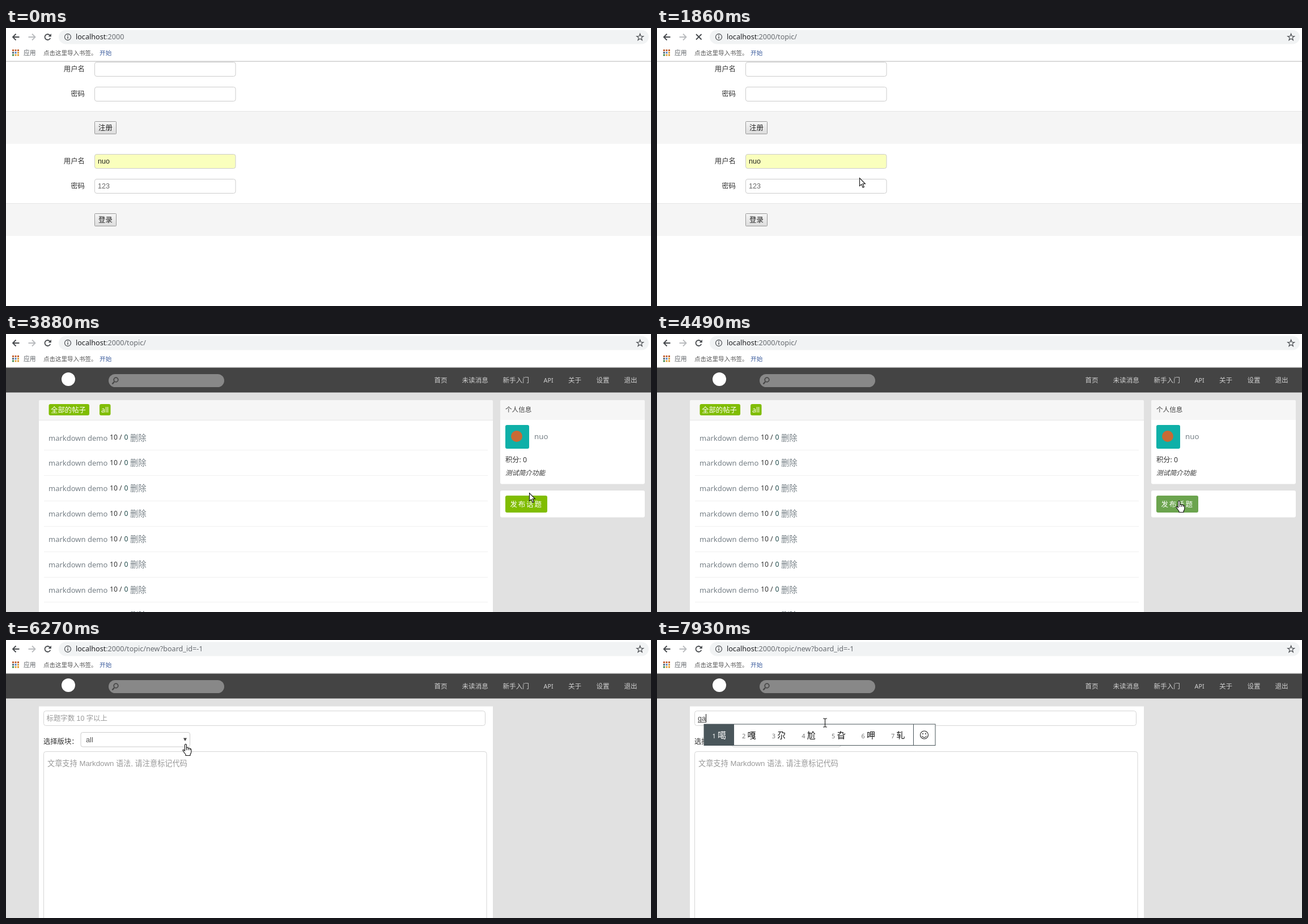
Write an HTML page with a canvas that moves like this. It is 1138 px wide and 492 px high and loops after 8000 ms.

```html
<!DOCTYPE html>
<html lang="zh-CN">
<head>
<meta charset="utf-8">
<title>localhost:2000</title>
<style>
html, body { margin: 0; width: 100%; height: 100%; overflow: hidden; background: #fff; }
canvas { display: block; width: 1138px; height: 492px; }
</style>
</head>
<body>
<canvas id="stage" width="1138" height="492"></canvas>
<script>
const ctx = document.getElementById('stage').getContext('2d');
const LOOP = 8000, TICK = 77.5;
const CJK = '"Noto Sans CJK SC", "Noto Sans CJK", sans-serif';
const UI = '"Noto Sans", ' + CJK;
const ARIAL = '"Liberation Sans", ' + CJK;
const GREEN = '#80bd01', USER = 'nuo';

// Pointer stops: [tick, x, y]
const STOPS = [
  [0, 850, 500], [1, 839, 484], [4, 659, 451], [7, 659, 451],
  [16, 180, 338], [19, 180, 338], [24, 357, 265], [39, 357, 265],
  [44, 696, 265], [45, 696, 265], [46, 689, 261], [50, 923, 281],
  [56, 921, 294], [63, 920, 297], [74, 920, 297], [81, 317, 184],
  [85, 301, 144], [86, 295, 149], [87, 290, 144], [90, 290, 144],
  [93, 296, 147], [110, 296, 147]
];

const ARROW = new Path2D('M.5 .5V14.6L3.7 11.6L6.2 17.2L8.4 16.2L6 10.8H10.4Z');
const HAND = new Path2D('M-1.5 12V1.5Q0 -.9 1.5 1.5V7Q3.6 5.4 4.5 7.5Q6.6 6.3 7.4 8.5Q9.6 8 9.8 10.5V14Q9.5 17 8 18.5V20.5H0V18.5Q-3 15 -5 11.5Q-5 8.6 -1.5 12Z');
const IBEAM = new Path2D('M-3.5 -7.5H-1L0 -6.5L1 -7.5H3.5M0 -6.5V6.5M-3.5 7.5H-1L0 6.5L1 7.5H3.5');

function rect(x, y, w, h, color) {
  ctx.fillStyle = color;
  ctx.fillRect(x, y, w, h);
}

function box(x, y, w, h, r, fill, line) {
  ctx.beginPath();
  ctx.roundRect(x, y, w, h, r);
  if (fill) { ctx.fillStyle = fill; ctx.fill(); }
  if (line) { ctx.strokeStyle = line; ctx.lineWidth = 1; ctx.stroke(); }
}

function disc(x, y, r, color) {
  ctx.beginPath();
  ctx.arc(x, y, r, 0, Math.PI * 2);
  ctx.fillStyle = color;
  ctx.fill();
}

function text(s, x, y, size, color, family = UI, style = '') {
  ctx.font = `${style} ${size}px ${family}`;
  ctx.fillStyle = color;
  ctx.fillText(s, x, y);
  return x + ctx.measureText(s).width;
}

function stroke(d, color, width) {
  ctx.strokeStyle = color;
  ctx.lineWidth = width;
  ctx.stroke(d instanceof Path2D ? d : new Path2D(d));
}

function within(p, x, y, w, h) {
  return p.x >= x && p.x < x + w && p.y >= y && p.y < y + h;
}

function pointerAt(n) {
  const i = STOPS.findIndex(s => s[0] > n);
  const [t0, x0, y0] = STOPS[i - 1], [t1, x1, y1] = STOPS[i];
  const k = (n - t0) / (t1 - t0), e = k * k * (3 - 2 * k);
  return { x: Math.round(x0 + (x1 - x0) * e), y: Math.round(y0 + (y1 - y0) * e) };
}

function drawToolbar(path, loading) {
  rect(0, 0, 1138, 59, '#fff');
  stroke('M23.5 16H12.5M17.5 10.5L12 16L17.5 21.5', '#46494d', 1.8);
  stroke('M39.5 16H50.5M46 10.5L51.5 16L46 21.5', '#b9bbbe', 1.8);
  if (loading) {
    stroke('M69 11L78.5 20.5M78.5 11L69 20.5', '#46494d', 1.8);
  } else {
    ctx.beginPath();
    ctx.arc(73.5, 16, 5, 0.35, Math.PI * 1.78);
    ctx.strokeStyle = '#46494d';
    ctx.lineWidth = 1.8;
    ctx.stroke();
    ctx.fillStyle = '#46494d';
    ctx.fill(new Path2D('M79.8 10V15.3H74.5Z'));
  }
  box(93, 3.5, 1041, 25, 12.5, '#f1f3f4');
  ctx.beginPath();
  ctx.arc(109, 16, 5.5, 0, Math.PI * 2);
  ctx.strokeStyle = '#55585c';
  ctx.lineWidth = 1.3;
  ctx.stroke();
  rect(108.3, 15, 1.5, 4, '#55585c');
  rect(108.3, 12.5, 1.5, 1.5, '#55585c');
  const end = text('localhost', 123, 20, 12.6, '#202124');
  text(':2000' + path, end, 20, 12.6, '#666a6f');

  ctx.beginPath();
  for (let i = 0; i < 10; i++) {
    const a = -Math.PI / 2 + i * Math.PI / 5, r = i % 2 ? 2.6 : 6.2;
    ctx.lineTo(1118.7 + r * Math.cos(a), 16.4 + r * Math.sin(a));
  }
  ctx.closePath();
  ctx.strokeStyle = '#55585c';
  ctx.lineWidth = 1.3;
  ctx.stroke();

  const dots = ['#c2602f', '#c2602f', '#c2602f', '#55606a', '#4c7fc4', '#dd9c34', '#3e8a4d', '#dd9c34', '#dd9c34'];
  dots.forEach((c, i) => rect(11 + i % 3 * 4.5, 38 + Math.floor(i / 3) * 4.2, 3, 3, c));
  text('应用', 31, 48, 10.8, '#5f6368');
  text('点击这里导入书签。', 66, 48, 10.5, '#555');
  text('开始', 165, 48, 10.7, '#3f5f9f');
  rect(0, 58.5, 1138, 1, '#b5b5b5');
}

function field(y, value, fill, color) {
  box(156.5, y + .5, 248.5, 25, 3.5, fill, '#ccc');
  text(value, 162, y + 17, 12.5, color, ARIAL);
}

function label(s, y) {
  ctx.textAlign = 'right';
  text(s, 139, y, 12.4, '#333');
  ctx.textAlign = 'left';
}

function loginForm(y, name, pass, action, fill, pressed) {
  label('用户名', y + 17);
  field(y, name, fill, '#222');
  label('密码', y + 61);
  field(y + 44, pass, '#fff', '#666');
  rect(0, y + 87, 1138, 58, '#f5f5f5');
  rect(0, y + 87, 1138, 1, '#e5e5e5');
  const g = ctx.createLinearGradient(0, y + 105, 0, y + 128);
  g.addColorStop(pressed ? 1 : 0, '#f6f6f6');
  g.addColorStop(pressed ? 0 : 1, '#dcdcdc');
  box(156.5, y + 105.5, 38, 22, 1, g, '#999');
  text(action, 163, y + 121, 12.4, '#222');
}

function drawLogin(n) {
  rect(0, 59, 1138, 433, '#fff');
  loginForm(60, '', '', '注册', '#fff', false);
  loginForm(223, USER, '123', '登录', '#faffbd', n === 18 || n === 19);
}

function drawNav() {
  rect(0, 59, 1138, 433, '#e1e1e1');
  rect(0, 59.5, 1138, 44, '#444');
  disc(110, 80, 12, '#fff');
  box(181, 71, 204, 23, 11.5, '#888');
  ctx.beginPath();
  ctx.arc(194, 81, 3.8, 0, Math.PI * 2);
  ctx.strokeStyle = '#484848';
  ctx.lineWidth = 1.8;
  ctx.stroke();
  stroke('M191 84.5L187.5 88.5', '#484848', 2.4);
  const items = [['首页', 755.5], ['未读消息', 804.5], ['新手入门', 876.5], ['API', 948.5],
    ['关于', 992], ['设置', 1041.5], ['退出', 1090.5]];
  for (const [s, x] of items) text(s, x, 86, s === 'API' ? 10.8 : 11.6, '#d0d0d0');
}

function card(x, y, w, h) {
  box(x, y, w, h, 3, '#fff');
}

function cardHead(x, w) {
  box(x, 117, w, 35, [3, 3, 0, 0], '#f6f6f6');
}

function drawTopics(n, p) {
  drawNav();
  card(58, 117, 801, 400);
  cardHead(58, 801);
  rect(58, 152, 801, 1, '#e5e5e5');
  box(75.5, 124, 71.5, 20, 3, GREEN);
  text('全部的帖子', 79, 138.5, 12.4, '#fff');
  box(165, 124, 19.5, 20, 3, GREEN);
  text('all', 168, 138.5, 12.3, '#fff');
  for (let i = 0; i < 8; i++) {
    const y = 188.5 + i * 44.9;
    text('markdown demo', 75, y, 13, '#778087');
    text('10 /', 183, y - 1.5, 12.2, '#333');
    text('0', 208.5, y - 1.5, 12.2, '#1f4a4a');
    text('删除', 219, y, 14.3, '#778087');
    rect(67, Math.round(205 + i * 44.9), 783, 1, '#f0f0f0');
  }

  card(872, 117, 255, 148.5);
  cardHead(872, 255);
  text('个人信息', 881, 138, 11.6, '#444');
  box(881, 161, 42, 42, 3, '#0fb0a8');
  disc(901, 181, 10, '#c96a35');
  text(USER, 932, 186, 13.3, '#778087');
  text('积分: 0', 881, 227, 12.3, '#333');
  text('测试简介功能', 881, 249.5, 11.7, '#333', UI, 'italic');

  card(872, 277, 255, 47.5);
  const hover = within(p, 881, 286, 74, 30);
  box(881, 286, 74, 30, 3, hover ? '#6ba44e' : GREEN);
  ctx.letterSpacing = '1.8px';
  text('发布话题', 889.5, 305.5, 12.5, '#fff');
  ctx.letterSpacing = '0px';
}

function drawIme() {
  rect(82.5, 148.5, 409, 38.5, '#4a565b');
  rect(136, 149.5, 316, 36.5, '#fff');
  rect(453, 149.5, 37.5, 36.5, '#fff');
  [...'噶嘎尕尬旮呷轧'].forEach((c, i) => {
    const x = 97.5 + i * 52.6;
    text(String(i + 1), x, 174, 11, i ? '#777' : '#fff');
    text(c, x + 9.5, 174, 15, i ? '#111' : '#fff');
  });
  ctx.beginPath();
  ctx.arc(471.5, 168, 7, 0, Math.PI * 2);
  ctx.strokeStyle = '#222';
  ctx.lineWidth = 1.1;
  ctx.stroke();
  ctx.beginPath();
  ctx.arc(471.5, 168.5, 4, 0.3, Math.PI - 0.3);
  ctx.stroke();
  disc(469, 166, 1, '#222');
  disc(474, 166, 1, '#222');
}

function drawEditor(n) {
  drawNav();
  rect(58, 117.5, 801, 375, '#fff');
  box(66.5, 125.5, 779, 26, 4, '#fff', '#d5d5d5');
  const typed = n >= 102 ? 'ga' : n >= 101 ? 'g' : '';
  if (typed) {
    const end = text(typed, 72, 143, 12.5, '#444', ARIAL);
    rect(72, 145, end - 72, 1, '#444');
    rect(Math.round(end), 131, 1, 15, '#111');
  } else {
    text('标题字数 10 字以上', 71.5, 143, 12.4, '#999', ARIAL);
    if (n >= 85 && (n < 91 || n >= 97)) rect(72, 131, 1, 15, '#111');
  }
  text('选择版块：', 66, 184, 12.3, '#333');
  box(132, 163.5, 192.5, 25.5, 3.5, '#fff', '#ccc');
  text('all', 141, 181, 12.8, '#555', ARIAL);
  ctx.fillStyle = '#444';
  ctx.fill(new Path2D('M313 173.5H319L316 179Z'));
  box(66.5, 197.5, 781.5, 320, 4, '#fff', '#d5d5d5');
  text('文章支持 Markdown 语法, 请注意标记代码', 73, 223, 13.2, '#999', ARIAL);
  if (n >= 102) drawIme();
}

function pointerKind(page, n, p) {
  if (page === 'login') {
    return within(p, 156, 267, 249, 26) || within(p, 156, 223, 249, 26) ? 'beam' : 'arrow';
  }
  if (page === 'topics') return within(p, 881, 286, 74, 30) ? 'hand' : 'arrow';
  if (n < 75 || within(p, 132, 163, 193, 27)) return 'hand';
  return within(p, 66, 125, 780, 27) || within(p, 66, 197, 782, 300) ? 'beam' : 'arrow';
}

function drawPointer(kind, p) {
  ctx.save();
  if (kind === 'beam') {
    ctx.translate(p.x + .5, p.y - .5);
    stroke(IBEAM, '#222', 1.2);
  } else {
    const shape = kind === 'hand' ? HAND : ARROW;
    ctx.translate(p.x, p.y);
    ctx.fillStyle = '#fff';
    ctx.fill(shape);
    stroke(shape, '#111', 1.1);
    if (kind === 'hand') stroke('M1.5 7V11M4.5 8V11M7.4 9V11', '#111', 1);
  }
  ctx.restore();
}

function draw(now) {
  const n = Math.floor((now % LOOP + 13) / TICK);
  const p = pointerAt(n);
  const page = n < 28 ? 'login' : n < 71 ? 'topics' : 'editor';
  const path = n < 20 ? '' : n < 67 ? '/topic/' : '/topic/new?board_id=-1';
  const loading = (n >= 20 && n < 28) || (n >= 61 && n < 71);

  if (page === 'login') drawLogin(n);
  else if (page === 'topics') drawTopics(n, p);
  else drawEditor(n);
  drawToolbar(path, loading);
  if (n > 0) drawPointer(pointerKind(page, n, p), p);
  requestAnimationFrame(() => draw(performance.now()));
}

draw(performance.now());
</script>
</body>
</html>
```
